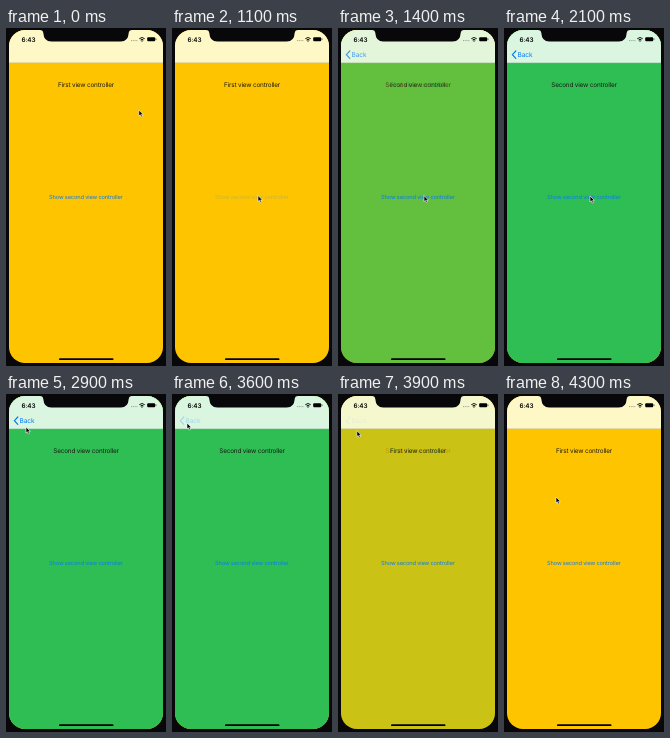
An HTML page that plays this animation: 160 px wide and 338 px high, repeating every 4.4 s.

```html
<!DOCTYPE html>
<html lang="en">
<head>
<meta charset="utf-8">
<title>View controllers</title>
<style>
  html, body { margin: 0; width: 100%; height: 100%; overflow: hidden; background: #08080a; }
  svg { display: block; width: 160px; height: 338px; }
  text { font-family: Inter, "Liberation Sans", sans-serif; text-rendering: geometricPrecision; }
  .title { font-size: 6.4px; letter-spacing: -.17px; text-anchor: middle; fill: #161a12; }
  .link { font-size: 5.7px; letter-spacing: -.15px; text-anchor: middle; fill: #087cf5; }
  .back { font-size: 6.6px; letter-spacing: -.12px; fill: #087cf5; }
  .clock { font-size: 6.4px; font-weight: 600; letter-spacing: -.1px; }
</style>
</head>
<body>
<svg viewBox="0 0 160 338">
  <clipPath id="screen"><rect x="3" y="2" width="154" height="333" rx="16"/></clipPath>
  <g clip-path="url(#screen)">
    <g>
      <rect width="160" height="338" fill="#ffc400"/>
      <rect width="160" height="35" fill="#fdf8c6"/>
      <rect y="34.6" width="160" height=".5" fill="#c9b466"/>
      <text class="title" x="80" y="59.4">First view controller</text>
      <text class="link" id="link" x="79.8" y="170.8">Show second view controller</text>
    </g>
    <g id="second">
      <rect width="160" height="338" fill="#2fbe53"/>
      <rect width="160" height="35" fill="#daf6e0"/>
      <rect y="34.6" width="160" height=".5" fill="#8cc79a"/>
      <g id="back">
        <path d="M11.8 23 8.4 26.7 11.8 30.4" fill="none" stroke="#087cf5" stroke-width="1.2" stroke-linecap="round"/>
        <text class="back" x="13.6" y="29.1">Back</text>
      </g>
      <text class="title" x="80" y="59.4">Second view controller</text>
      <text class="link" x="79.8" y="170.8">Show second view controller</text>
    </g>
    <text class="clock" x="15.4" y="13.6">6:43</text>
    <path d="M125 12.6h6.5" stroke="#8a8a78" stroke-width=".9" stroke-dasharray=".9 .9"/>
    <g fill="none" stroke="#111" stroke-width="1">
      <path d="M133.3 10.7q2.7-2.4 5.4 0M134.5 12q1.5-1.3 3 0"/>
      <circle cx="136" cy="13" r=".3"/>
    </g>
    <rect x="141.2" y="9.3" width="8" height="4" rx="1"/>
    <path d="M150 10.5v1.6" stroke="#333" stroke-width=".7"/>
    <rect x="53" y="330.3" width="54.5" height="1.8" rx=".9"/>
    <path d="M34 0V2q3 0 3.3 3 .5 8.5 8 8.5H114.7q7.5 0 8-8.5 .3-3 3.3-3V0z" fill="#08080a"/>
  </g>
  <path id="cursor" d="M0 0V6L1.4 4.8 2.4 7 3.5 6.5 2.6 4.4H4.4Z" stroke="#fff" stroke-width=".6" stroke-linejoin="round"/>
</svg>
<script>
const LOOP = 4400, STEP = 100;
const $ = id => document.getElementById(id);
const clamp = x => Math.min(1, Math.max(0, x));
const smooth = x => x * x * (3 - 2 * x);
const easeOut = x => 1 - (1 - clamp(x)) ** 2;

// time, x, y of the pointer tip
const path = [
  [0, 132.8, 82], [1000, 86, 167.5], [2200, 86, 168], [2900, 20, 33],
  [3400, 15, 29], [3800, 15, 29], [4300, 52, 103]
];

function pointer(t) {
  const i = path.findIndex(p => p[0] > t);
  if (i < 0) return path[path.length - 1].slice(1);
  const [t0, ...a] = path[i - 1], [t1, ...b] = path[i];
  const k = smooth((t - t0) / (t1 - t0));
  return a.map((v, j) => v + (b[j] - v) * k);
}

function draw(now) {
  const t = Math.floor(now % LOOP / STEP) * STEP;
  const shown = easeOut((t - 1200) / 400) - easeOut((t - 3700) / 400);
  $("second").setAttribute("opacity", shown);
  $("link").setAttribute("opacity", t >= 1100 && t < 1400 ? .22 : 1);
  $("back").setAttribute("opacity", t >= 3500 ? .25 : 1);
  $("cursor").setAttribute("transform", `translate(${pointer(t)})`);
}

const start = performance.now();
function tick() {
  draw(performance.now() - start);
  requestAnimationFrame(tick);
}
tick();
</script>
</body>
</html>
```
